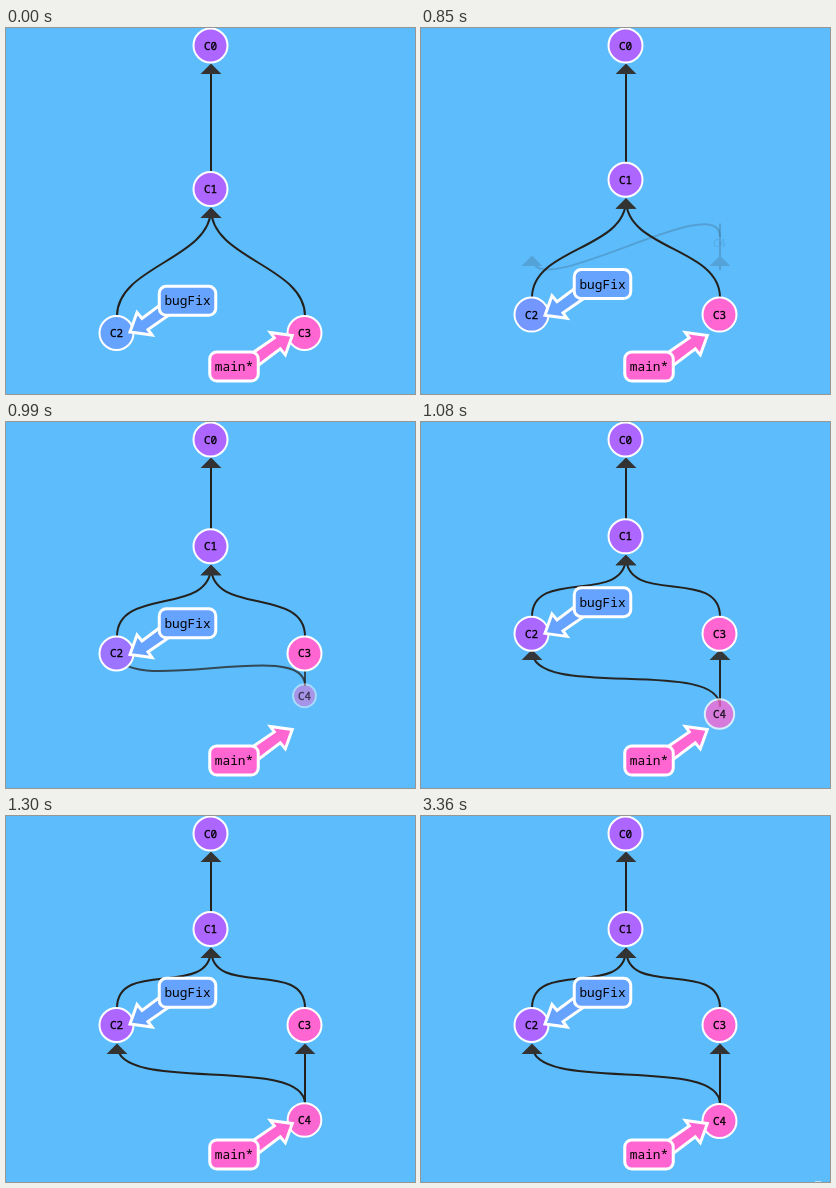
These frames come from a looping animation (409x366 px, 3460 ms). An HTML page:

```html
<!DOCTYPE html>
<html lang="en">
<head>
<meta charset="utf-8">
<title>Merge</title>
<style>
  html, body { margin: 0; width: 100%; height: 100%; overflow: hidden; background: #5cbcfc; }
  svg { display: block; width: 409px; height: 366px; }
  text { font-family: "Noto Sans Mono", "DejaVu Sans Mono", monospace; text-anchor: middle; fill: #000; }
  .node circle { stroke: #fff; stroke-width: 2; }
  .node text { font-size: 11px; stroke: #000; stroke-width: .3; }
  .line { fill: none; stroke: #24211d; stroke-width: 2; }
  .head { fill: #333; stroke: #333; stroke-width: 2; }
  .tag path, .tag rect { stroke: #fff; stroke-width: 3; }
  .tag text { font-size: 12.83px; }
</style>
</head>
<body>
<svg viewBox="0 0 409 366">
  <g id="edges"></g>
  <g id="nodes"></g>
  <g id="tags"></g>
  <rect id="glint" x="394" y="365" width="6" height="1" fill="#fff" opacity=".6"/>
</svg>
<script>
const LOOP = 3460, R = 17, GAP = 20, HEAD = 8, BEND = 50;
const BLUE = [102, 163, 255], PURPLE = [173, 102, 255], PINK = [255, 102, 209];
const LEFT = 110.5, MID = 204.5, RIGHT = 298.5;

// moments at which the picture advances
const TICKS = [750, 790, 840, 890, 940, 990, 1030, 1080, 1120, 1170, 1210, 1260,
               1300, 1350, 1400, 1440, 1490, 1530];

const $ = id => document.getElementById(id);
const clamp = v => Math.max(0, Math.min(1, v));
const lerp = (a, b, p) => a + (b - a) * p;
const mix = (a, b, p) => `rgb(${a.map((v, i) => Math.round(lerp(v, b[i], p)))})`;

function add(parent, name, attrs = {}) {
  const el = document.createElementNS("http://www.w3.org/2000/svg", name);
  set(el, attrs);
  return parent.appendChild(el);
}

function set(el, attrs) {
  for (const k in attrs) el.setAttribute(k, attrs[k]);
}

// cubic-bezier(.42, 0, .58, 1)
function easeInOut(x) {
  let lo = 0, hi = 1;
  for (let i = 0; i < 24; i++) {
    const t = (lo + hi) / 2, u = 1 - t;
    if (3 * u * u * t * .42 + 3 * u * t * t * .58 + t * t * t < x) lo = t;
    else hi = t;
  }
  return lo * lo * (3 - 2 * lo);
}

function bounce(x) {
  const s = 7.5625, w = 2.75;
  if (x < 1 / w) return s * x * x;
  if (x < 2 / w) return s * (x - 1.5 / w) ** 2 + .75;
  if (x < 2.5 / w) return s * (x - 2.25 / w) ** 2 + .9375;
  return s * (x - 2.625 / w) ** 2 + .984375;
}

function makeNode(name, x, color) {
  const g = add($("nodes"), "g", { class: "node" });
  const disc = add(g, "circle", { r: R, fill: mix(color, color, 0) });
  const label = add(g, "text", { y: 4 });
  label.textContent = name;
  return { disc, label, move: y => set(g, { transform: `translate(${x} ${y})` }) };
}

function makeTag(name, x, y, width, color, tip, turn) {
  const g = add($("tags"), "g", { class: "tag" });
  const fill = mix(color, color, 0);
  add(g, "path", {
    d: "M0 0L-22 -3L-18 2.5L-42 19L-34 30L-12 13.5L-7 19.5Z",
    transform: `translate(${tip}) rotate(${turn})`, fill
  });
  add(g, "rect", { x: x - width / 2, y: y - 14.5, width, height: 29, rx: 7, fill });
  add(g, "text", { x, y: y + 4.5 }).textContent = name;
  return g;
}

function makeEdge() {
  const g = add($("edges"), "g");
  return { g, line: add(g, "path", { class: "line" }), head: add(g, "path", { class: "head" }) };
}

// curve from the top of the child to an arrowhead under the parent
function link(edge, childX, childY, parentX, parentY) {
  const x1 = childX + .5, x2 = parentX + .5;
  const a = childY - R, b = parentY + GAP;
  set(edge.line, { d: `M${x1} ${a}C${x1} ${a - BEND} ${x2} ${b + BEND} ${x2} ${b}` });
  set(edge.head, { d: `M${x2} ${b}l${-HEAD} ${HEAD}h${2 * HEAD}Z` });
}

const trunk = makeEdge(), leftArm = makeEdge(), rightArm = makeEdge();
const births = [makeEdge(), makeEdge()];
const c4 = makeNode("C4", RIGHT, PINK);
const c0 = makeNode("C0", MID, PURPLE);
const c1 = makeNode("C1", MID, PURPLE);
const c2 = makeNode("C2", LEFT, BLUE);
const c3 = makeNode("C3", RIGHT, PINK);
const bugFix = makeTag("bugFix", 181.5, 272.8, 56.5, BLUE, "124 304", 180);
makeTag("main*", 228, 338.5, 48.5, PINK, "286.3 307.4", 0);
c0.move(17.5);

function draw(ms) {
  let t = 0;
  for (const tick of TICKS) if (ms >= tick) t = tick;

  // nodes lead, the tag and new edges follow, the new node bounces in
  const p = easeInOut(clamp((t - 714) / 415));
  const q = easeInOut(clamp((t - 720) / 415));
  const b = bounce(clamp((t - 772) / 730));

  const y1 = lerp(161, 113, p), y2 = lerp(305, 209, p);
  c1.move(y1);
  c2.move(y2);
  c3.move(y2);
  set(c2.disc, { fill: mix(BLUE, PURPLE, p) });
  set(bugFix, { transform: `translate(0 ${-96 * q})` });
  link(trunk, MID, y1, MID, 17);
  link(leftArm, LEFT, y2, MID, y1);
  link(rightArm, RIGHT, y2, MID, y1);

  c4.move(lerp(209, 305, b));
  set(c4.disc, { r: R * b, opacity: b * b });
  set(c4.label, { opacity: b });
  [LEFT, RIGHT].forEach((x, i) => {
    link(births[i], RIGHT, lerp(209, 305, q), x, 209);
    set(births[i].g, { opacity: q });
  });

  set($("glint"), { visibility: ms >= 3360 ? "visible" : "hidden" });
}

const start = performance.now();
function frame() {
  draw((performance.now() - start) % LOOP);
  requestAnimationFrame(frame);
}
frame();
</script>
</body>
</html>
```
